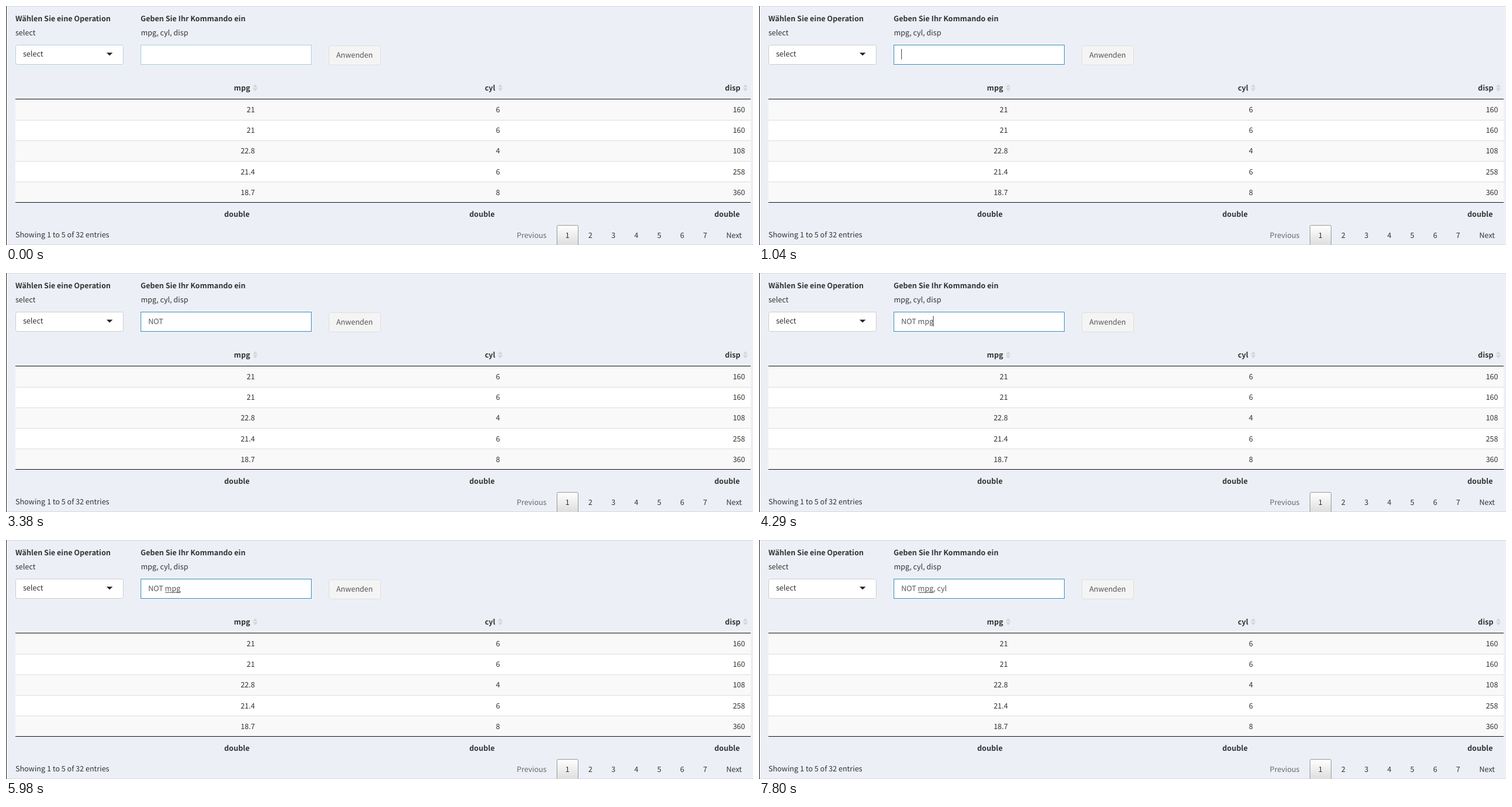
An HTML page for the animation above (8000 ms loop, 1271 px wide and 407 px high).

```html
<!DOCTYPE html>
<html lang="de">
<head>
<meta charset="utf-8">
<style>
html, body { margin: 0; width: 100%; height: 100%; overflow: hidden; background: #ecf0f6; }
svg { display: block; }
text {
  font: 12.54px "Noto Sans CJK JP", "Noto Sans CJK SC", "Noto Sans CJK KR", "Noto Sans CJK TC", "Noto Sans CJK", "Open Sans", sans-serif;
  fill: #333; white-space: pre; text-rendering: geometricPrecision;
}
.b { font-weight: 700; }
.end { text-anchor: end; }
.mid { text-anchor: middle; }
.soft { fill: #666; }
.input { fill: #555; }
</style>
</head>
<body>
<svg id="stage" width="1271" height="407" viewBox="0 0 1271 407">
  <defs>
    <linearGradient id="page" x2="0" y2="1">
      <stop stop-color="#fff"/><stop offset="1" stop-color="#dcdcdc"/>
    </linearGradient>
  </defs>
</svg>
<script>
const stage = document.getElementById('stage');

function add(tag, attrs, content = '') {
  const el = document.createElementNS('http://www.w3.org/2000/svg', tag);
  for (const k in attrs) el.setAttribute(k, attrs[k]);
  el.textContent = content;
  return stage.appendChild(el);
}
const text = (x, y, s, cls = '') => add('text', { x, y, class: cls }, s);
const rect = (x, y, width, height, fill, more) => add('rect', { x, y, width, height, fill, ...more });
const box = (x, y, w, h, fill, stroke, rx = 0) => rect(x + .5, y + .5, w - 1, h - 1, fill, { stroke, rx });
const path = (d, fill) => add('path', { d, fill });

// Window edges
rect(0, 0, 1271, 1, '#d5d9df');
rect(0, 406, 1271, 1, '#d5d9df');
rect(0, 0, 1, 407, '#222');

// Form
text(16, 26, 'Wählen Sie eine Operation', 'b');
text(16, 50, 'select');
const choice = box(16, 66, 184, 34, '#fff', '#ccc', 3);
text(29, 86, 'select');
path('M171 79.5h10.5l-5.25 5z', '#222');
text(229, 26, 'Geben Sie Ihr Kommando ein', 'b');
text(229.5, 50, 'mpg, cyl, disp');
const field = box(229, 66, 291, 34, '#fff', '#3c8dbc');
box(549, 67, 89, 34, '#f4f4f4', '#ddd', 3);
text(562, 88, 'Anwenden', 'input');

// Table
const columns = [
  ['mpg', 423.5, [21, 21, 22.8, 21.4, 18.7]],
  ['cyl', 840.5, [6, 6, 4, 6, 8]],
  ['disp', 1257.5, [160, 160, 108, 258, 360]]
];
for (let i = 0; i < 5; i++) {
  const y = 159 + i * 35;
  rect(16, y, 1251, 35, i % 2 ? '#fff' : '#f9f9f9');
  if (i) rect(16, y, 1251, 1, '#ddd');
}
for (const y of [158, 334]) rect(16, y, 1251, 1, '#111');
for (const [name, right, values] of columns) {
  text(right - 8, 144, name, 'b end');
  path(`M${right - 3.5} 138.5l4-5.5 4 5.5zm0 1.5h8l-4 5.5z`, '#d3d6da');
  values.forEach((v, i) => text(right, Math.round(181 + i * 35.2), v, 'end'));
  text(right - 9, 359, 'double', 'b end');
}

// Pager
text(16, 394, 'Showing 1 to 5 of 32 entries');
text(869, 395, 'Previous', 'soft');
box(937, 373, 37, 36, 'url(#page)', '#979797', 2);
for (let n = 1; n < 8; n++) text(955.3 + (n - 1) * 39.05, 395, n, 'mid');
text(1225.5, 395, 'Next');

// Typed command
const typed = text(242, 87, '', 'input');
const caret = rect(242, 73, 1, 18, '#444');
const wave = 'M271 90' + 'l2 -1.4l2 1.4'.repeat(6) + 'l2 -1.4';
const squiggle = add('path', { d: wave, fill: 'none', stroke: '#444' });

// [time, text]
const keys = [
  [0, ''], [2080, 'N'], [2340, 'NO'], [2860, 'NOT'], [3900, 'NOT '],
  [4160, 'NOT mp'], [4290, 'NOT mpg'], [5460, 'NOT mpg '], [6240, 'NOT mpg'],
  [6630, 'NOT mpg,'], [6760, 'NOT mpg, c'], [6890, 'NOT mpg, cy'], [7280, 'NOT mpg, cyl']
];
// Times at which the caret toggles, hidden at first
const blinks = [130, 520, 1040, 1690, 2080, 3380, 3900, 4810, 5330, 5980, 6240, 7800];

function draw(t) {
  const s = keys.filter(k => k[0] <= t).pop()[1];
  typed.textContent = s;
  const width = s ? typed.getComputedTextLength() - .6 : 0;
  caret.setAttribute('x', Math.round(242 + width));
  caret.style.display = blinks.filter(b => b <= t).length % 2 ? '' : 'none';
  squiggle.style.display = t >= 5460 ? '' : 'none';
  field.setAttribute('stroke', t < 130 ? '#a9cbdf' : '#3c8dbc');
  choice.setAttribute('stroke', t < 130 ? '#b9cfdf' : '#ccc');
}

const start = performance.now();
function tick(now) {
  draw(Math.max(0, now - start) % 8000);
  requestAnimationFrame(tick);
}
draw(0);
requestAnimationFrame(tick);
</script>
</body>
</html>
```
